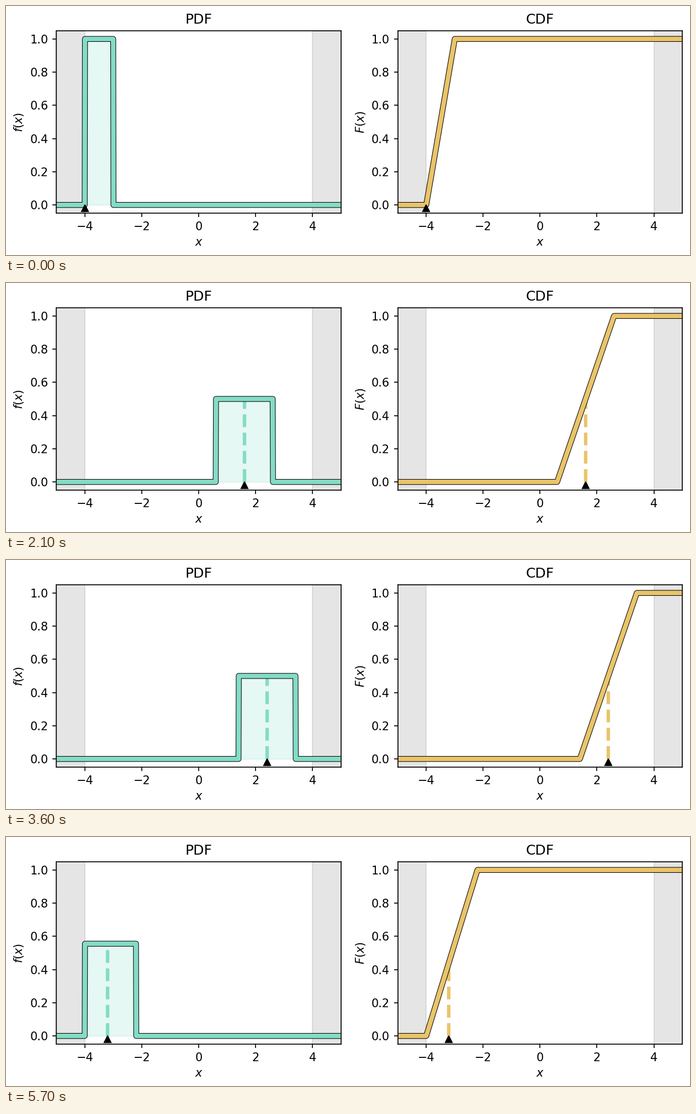
A matplotlib script for the animation above (6000 ms loop, 1239 px wide and 452 px high).

```python
import numpy as np
import matplotlib.pyplot as plt
import matplotlib.patheffects as pe
from matplotlib.animation import FuncAnimation

W, H, DPI = 1239, 452, 150
FRAMES, INTERVAL = 20, 300
LOW, HIGH, HALF = -4, 4, 1
TEAL, GOLD = "#84dcc6", "#e9c46a"

x = np.linspace(-5, 5, 1000)
outline = [pe.Stroke(linewidth=5, foreground="black"), pe.Normal()]

fig = plt.figure(figsize=(W / DPI, H / DPI), dpi=DPI)


def add_axes(left):
    top, bottom, width = 44.7, 376.2, 515.4
    return fig.add_axes([left / W, 1 - bottom / H, width / W, (bottom - top) / H])


pdf_ax, cdf_ax = add_axes(91.5), add_axes(709.7)


def pdf(v, a, b):
    return np.where((v >= a) & (v <= b), 1 / (b - a), 0.0)


def cdf(v, a, b):
    return np.clip((v - a) / (b - a), 0, 1)


def draw_panel(ax, func, center, color, title, label, fill=False):
    a, b = max(center - HALF, LOW), min(center + HALF, HIGH)
    y = func(x, a, b)
    ax.clear()
    for span in ((-5, LOW), (HIGH, 5)):
        ax.axvspan(*span, color="gray", alpha=0.2)
    if fill:
        ax.fill_between(x, y, color=color, alpha=0.2)
    ax.plot([center] * 2, [0, float(func(center, a, b))], "--", color=color, lw=3)
    ax.plot(x, y, color=color, lw=4, path_effects=outline)
    ax.plot(center, -0.02, "k^", ms=6)
    ax.set(xlim=(-5, 5), ylim=(-0.05, 1.05), title=title, xlabel="$x$", ylabel=label)


def draw(i):
    # the center sweeps from LOW to HIGH and back at constant speed
    half_loop = FRAMES // 2
    center = HIGH - (HIGH - LOW) * abs(half_loop - i) / half_loop
    draw_panel(pdf_ax, pdf, center, TEAL, "PDF", "$f(x)$", fill=True)
    draw_panel(cdf_ax, cdf, center, GOLD, "CDF", "$F(x)$")
    return []


anim = FuncAnimation(fig, draw, frames=FRAMES, interval=INTERVAL,
                     init_func=lambda: [], repeat=True, repeat_delay=0)
plt.show()
```
